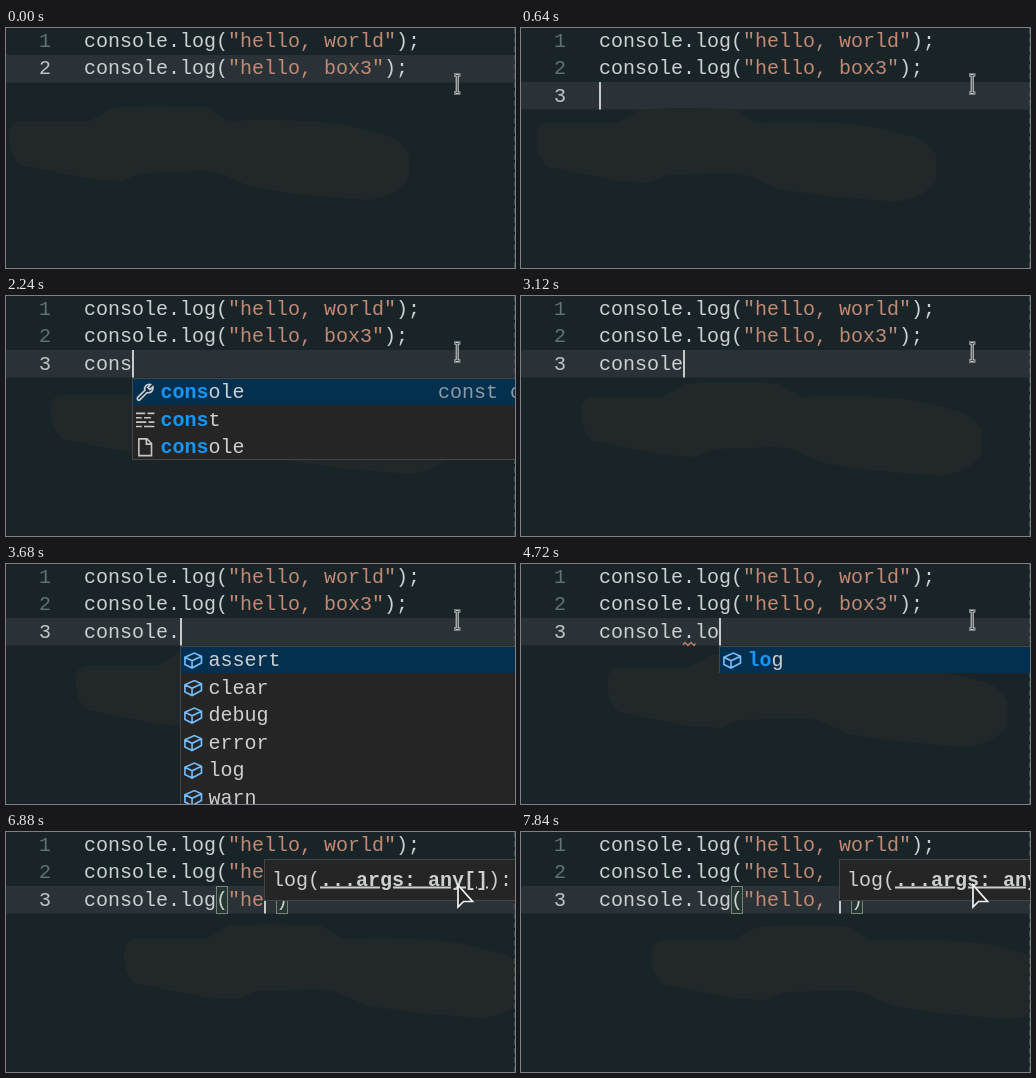
Recreate the animation shown at these times as an HTML page. Size 509 by 240 pixels, loop 8000 ms.

```html
<!DOCTYPE html>
<html lang="en">
<head>
<meta charset="utf-8">
<title>Code editor</title>
<style>
  html, body { margin: 0; width: 100%; height: 100%; overflow: hidden; background: #192428; }
  svg { display: block; }
  text { font: 20px "Liberation Mono", "Courier New", monospace; white-space: pre; }
  .hit { font-weight: bold; fill: #1297f8; }
  .arg { font-weight: bold; text-decoration: underline; }
</style>
</head>
<body>
<svg width="509" height="240" viewBox="0 0 509 240">
  <g id="lineBar"></g>
  <path id="smudge" fill="#222829" d="M3 103Q5 94 14 93L84 93 107 80Q127 77 200 79L222 93Q290 90 340 97L383 108Q403 118 403 130L403 150Q393 167 363 172L290 166 245 159 225 150Q212 143 195 143L135 145 115 153 85 151 15 137Q2 129 3 103Z"/>
  <path d="M508.5 0V240" stroke="#3d4c4f" stroke-dasharray="6 3"/>
  <g id="editor"></g>
</svg>
<script>
const LOOP = 8000, LEFT = 78, CHAR = 12, ROW = 27.5, LIST_TOP = 82;
const lines = ['console.log("hello, world");', 'console.log("hello, box3");'];

// label, icon, detail
const con = ['console', 'wrench', 'const console: Console'];
const cst = ['const', 'words'];
const file = ['console', 'file'];
const all = [con, cst, ['continue', 'words'], file,
  ['Box3CameraFreezedAxis', 'enum'], ['Box3CameraMode', 'enum']];
const methods = ['assert', 'clear', 'debug', 'error', 'log', 'warn'].map(m => [m, 'cube']);
const log = [['log', 'cube']];

const icons = {
  wrench: ['#d0d0d0', 'M1.5 12.5l6.2-6.2a4 4 0 0 1 5-5l-2.4 2.6 1.8 1.8 2.6-2.4a4 4 0 0 1-5 5l-6.2 6.2a1.4 1.4 0 0 1-2-2z'],
  words: ['#c5c5c5', 'M0 2.5h8M10 2.5h6M0 6.3h5M7 6.3h6M0 10.1h9M11 10.1h5M0 13.9h5M7 13.9h9'],
  file: ['#c5c5c5', 'M2.5 .8h7l4 4v10.5h-11zM9 .8v4.5h4.5'],
  enum: ['#ee9d28', 'M6.5 7.5v-5h8v6h-4M1.5 7.5h8v6h-8zM9 5.3h3.5M3.5 10.5h4'],
  cube: ['#75beff', 'M.8 5.5l8.2-3.7 6.2 2.7v6l-8.2 4.3-6.2-3zM.8 5.5l6.2 3 8.2-4M7 8.5v6']
};

// Each step changes part of the state; typing brings the caret back.
const on = { caret: true }, off = { caret: false };
const type = (text, more) => ({ text, caret: true, ...more });
const call = 'console.log(';
const steps = [
  [0, { text: null, caret: false, list: null, at: 0, hint: 0, error: false }],
  [400, on],
  [640, type('')],
  [1120, off],
  [1840, type('c', { list: all, at: 1 })],
  [2000, type('co', { at: 2 })],
  [2080, type('con', { at: 3 })],
  [2240, type('cons', { list: [con, cst, file], at: 4 })],
  [2400, type('conso', { list: [con, file], at: 5 })],
  [2880, off],
  [3120, type('console', { list: null })],
  [3600, type('console.')],
  [3680, { list: methods, at: 8 }],
  [4160, { caret: false, error: true }],
  [4480, type('console.l')],
  [4560, { list: log, at: 9 }],
  [4720, type('console.lo', { at: 10 })],
  [5040, type('console.log', { list: null })],
  [5440, type(call)],
  [5520, { hint: 12 }],
  [5840, type(call + '"')],
  [5920, { hint: 13 }],
  [6400, { caret: false, error: false }],
  [6640, type(call + '"h')],
  [6720, { hint: 14 }],
  [6800, type(call + '"he')],
  [6880, { hint: 15 }],
  [6960, type(call + '"hel')],
  [7040, { hint: 16 }],
  [7120, type(call + '"hell', { hint: 17 })],
  [7200, type(call + '"hello')],
  [7280, { hint: 18 }],
  [7440, type(call + '"hello,')],
  [7520, { hint: 19 }],
  [7840, type(call + '"hello, ', { hint: 20 })]
];

const colX = n => LEFT + n * CHAR;
const rect = (x, y, w, h, fill, stroke = 'none') =>
  `<rect x="${x}" y="${y}" width="${w}" height="${h}" fill="${fill}" stroke="${stroke}"/>`;
const text = (x, y, s, fill = '#cdd0d0') => `<text x="${x}" y="${y}" fill="${fill}">${s}</text>`;
const path = (d, stroke, width, fill = 'none') =>
  `<path d="${d}" stroke="${stroke}" stroke-width="${width}" fill="${fill}"/>`;

function codeLine(i, code, active) {
  const y = 18.5 + i * ROW;
  const colored = code.replace(/"[^"]*"/, s => `<tspan fill="#c08a75">${s}</tspan>`);
  return text(33, y, i + 1, active ? '#c0c4c4' : '#627173') + text(LEFT, y, colored);
}

function brackets(s, tail) {
  const box = n => rect(colX(n) + .5, 54.5, 11, 27, '#0064001a', '#76857f');
  return box(11) + box(s.text.length + tail.length - 1);
}

function mark(label, word) {
  const n = label.startsWith(word) ? word.length : 0;
  if (n) return `<tspan class="hit">${label.slice(0, n)}</tspan>${label.slice(n)}`;
  return label.replace('C', '<tspan class="hit">C</tspan>');
}

function suggestions({ list, at, text: typed }) {
  const x = colX(at), word = typed.split('.').pop();
  let out = rect(x + .5, LIST_TOP + .5, 600, Math.floor(list.length * ROW) - 1, '#252526', '#454545');
  out += rect(x + 1, LIST_TOP + 1, 600, 26, '#04304f');
  list.forEach(([label, icon, detail], i) => {
    const y = LIST_TOP + i * ROW, [color, d] = icons[icon];
    out += `<g transform="translate(${x + 4} ${y + 5}) scale(1.15)">${path(d, color, 1.4)}</g>`;
    out += text(x + 28.5, y + 20, mark(label, word));
    if (detail && i === 0) out += text(x + 306, y + 20, detail, '#8d9aa3');
  });
  return out;
}

function signature(n) {
  const x = colX(n);
  return rect(x + .5, 27.5, 600, 41, '#252526', '#454545') +
    text(x + 8, 53.5, 'log(<tspan class="arg">...args: any[]</tspan>): void');
}

function pointer(arrow) {
  if (arrow) return path('M452 53V75l5.5-5.5h9z', '#f4f4f4', 1.7, '#242424');
  const beam = 'M448 47h2.2l1 1 1-1h2.2M451.2 47.5v17M448 65h2.2l1-1 1 1h2.2';
  return path(beam, '#dcdcdc', 3) + path(beam, '#2a2f31', 1);
}

function draw(s) {
  const row = s.text === null ? 1 : 2;
  const typed = s.text || '';
  const tail = typed.includes('"') ? '")' : typed.includes('(') ? ')' : '';
  let out = lines.map((l, i) => codeLine(i, l, i === row)).join('');
  if (tail) out += brackets(s, tail);
  if (row === 2) out += codeLine(2, typed + tail, true);
  if (s.error) out += path('M162 81l2-2.5 3 3 3-3 3 3 1.5-2', '#c47d6a', 1.3);
  if (s.caret) out += rect(colX(row === 1 ? lines[1].length : typed.length), row * 27, 2, 27.5, '#c8caca');
  if (s.list) out += suggestions(s);
  if (s.hint) out += signature(s.hint);
  lineBar.innerHTML = rect(0, row * 27, 509, 27.5, '#2a3237');
  editor.innerHTML = out + pointer(s.hint);
}

const lineBar = document.getElementById('lineBar');
const editor = document.getElementById('editor');
const smudge = document.getElementById('smudge');
let shown = -1;

function frame() {
  const ms = performance.now() % LOOP, t = ms / 1000;
  const past = steps.filter(([start]) => start <= ms);
  if (past.length !== shown) {
    shown = past.length;
    draw(Object.assign({}, ...past.map(([, change]) => change)));
  }
  // The faint patch drifts right and down, slowing.
  smudge.setAttribute('transform', `translate(${19.8 * t - .45 * t * t} ${2.9 * t - .12 * t * t})`);
  requestAnimationFrame(frame);
}
frame();
</script>
</body>
</html>
```
